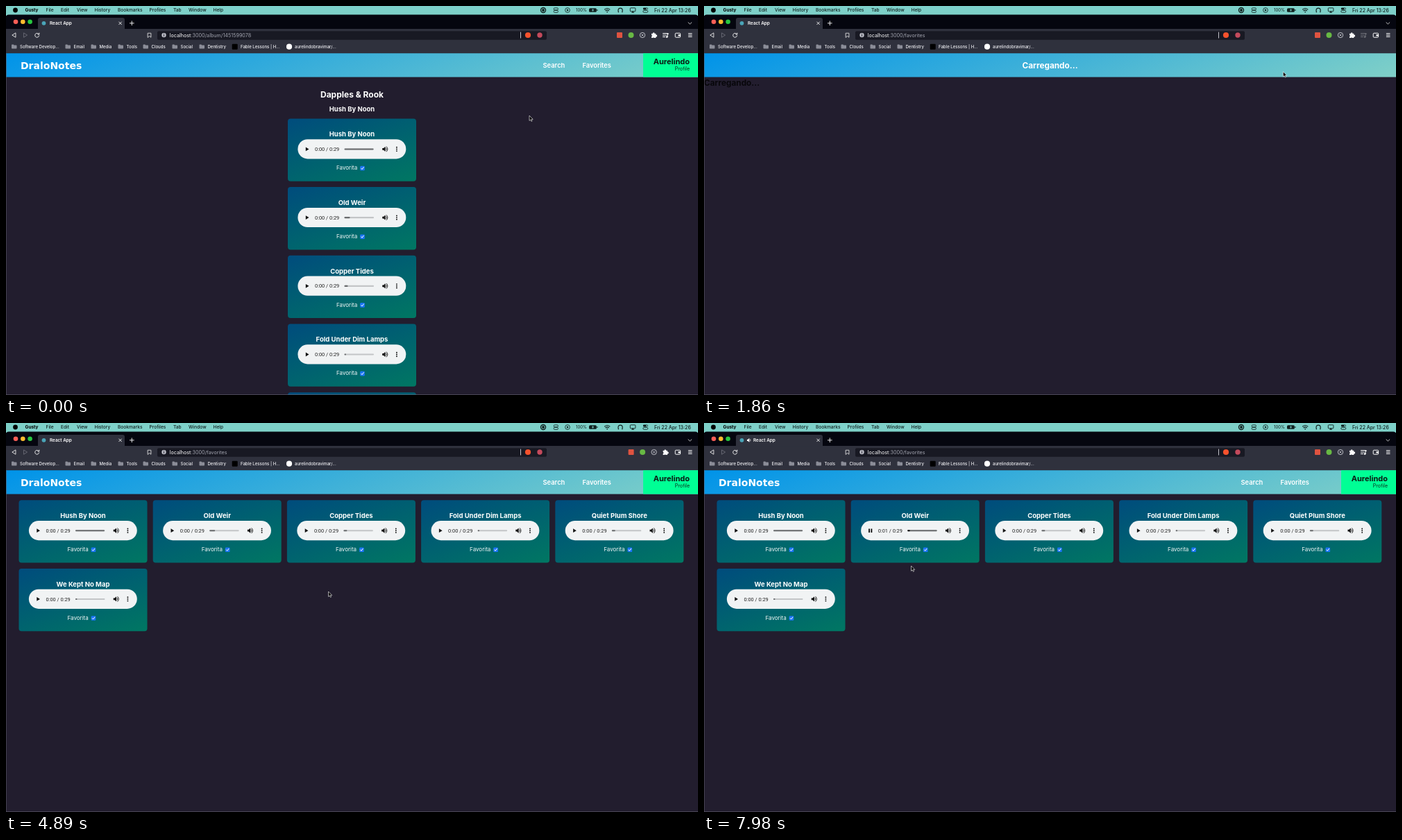
These frames come from a looping animation (997x561 px, 8000 ms). An HTML page:

```html
<!DOCTYPE html>
<html lang="en">
<head>
<meta charset="utf-8">
<title>Music player</title>
<style>
  html, body { margin: 0; width: 100%; height: 100%; overflow: hidden; background: #221d2e; }
  svg { display: block; width: 997px; height: 561px; font-family: Inter, sans-serif; }
</style>
</head>
<body>
<svg id="stage" viewBox="0 0 997 561"></svg>
<script>
const LOOP = 8000;
const TIMES = { status: 450, navigate: 780, loading: 1500, cards: 2000, header: 3000,
                iconGone: 3350, hover: 5650, play: 6250, unhover: 6590, speaker: 6750, second: 7300 };

// [time, x, y] of the pointer tip
const POINTER = [
  [0, 754, 158], [60, 754, 158], [600, 852, 88], [1750, 852, 88], [2550, 516, 215],
  [2950, 482, 271], [3450, 464.5, 243], [4920, 464.5, 243], [5250, 372, 254],
  [5700, 240, 156], [6440, 240, 156], [6570, 250, 184], [6950, 284, 244],
  [7420, 298.5, 206], [LOOP, 298.5, 206]
];

// title and buffered width of each track
const TRACKS = [
  ['Hush By Noon', 42], ['Old Weir', 8], ['Copper Tides', 5],
  ['Fold Under Dim Lamps', 2.5], ['Quiet Plum Shore', 5], ['We Kept No Map', 2.5]
];

const text = (x, cy, str, size, fill = '#fff', attrs = '') =>
  `<text x="${x}" y="${cy + size * 0.36}" font-size="${size}" fill="${fill}" ${attrs}>${str}</text>`;
const rect = (x, y, w, h, fill, r = 0, attrs = '') =>
  `<rect x="${x}" y="${y}" width="${w}" height="${h}" rx="${r}" fill="${fill}" ${attrs}/>`;
const circle = (x, y, r, fill, attrs = '') =>
  `<circle cx="${x}" cy="${y}" r="${r}" fill="${fill}" ${attrs}/>`;
const line = (d, color, width = 0.9) =>
  `<path d="${d}" fill="none" stroke="${color}" stroke-width="${width}" stroke-linecap="round" stroke-linejoin="round"/>`;
const shape = (d, fill, attrs = '') => `<path d="${d}" fill="${fill}" ${attrs}/>`;
const group = (id, body, attrs = '') => `<g id="${id}" ${attrs}>${body}</g>`;
const bold = 'font-weight="700"', medium = 'font-weight="500"', middle = 'text-anchor="middle"';

const defs = `<defs>
  <linearGradient id="bar" gradientUnits="userSpaceOnUse" x1="434.7" y1="-89.8" x2="562.3" y2="260.8">
    <stop stop-color="#0093e9"/><stop offset="1" stop-color="#80d0c7"/></linearGradient>
  <linearGradient id="card" gradientUnits="userSpaceOnUse" x1="67.1" y1="-24.5" x2="117.9" y2="115">
    <stop stop-color="#004c7d"/><stop offset="1" stop-color="#007762"/></linearGradient>
</defs>`;

function menuBar() {
  const items = [['File', 57.5], ['Edit', 79], ['View', 102], ['History', 127.5], ['Bookmarks', 161],
    ['Profiles', 206.5], ['Tab', 241], ['Window', 263], ['Help', 298.5]];
  const ink = '#10201f';
  return rect(0, 0, 997, 14, '#7dd0c8') + circle(13.5, 6, 3.4, '#000')
    + text(27.5, 6, 'Gusty', 6.5, '#000', bold)
    + items.map(([s, x]) => text(x, 6, s, 6.6, ink, medium)).join('')
    + circle(774, 6, 3.5, 'none', `stroke="${ink}" stroke-width="1.4"`) + circle(774, 6, 1.9, ink)
    + rect(789.3, 2.8, 6, 3, 'none', 1, `stroke="${ink}" stroke-width=".8"`)
    + rect(789.3, 6.4, 6, 3, 'none', 1, `stroke="${ink}" stroke-width=".8"`)
    + circle(809, 6, 3.4, 'none', `stroke="${ink}" stroke-width=".8"`) + shape('M808 4.3v3.4l2.8-1.7z', ink)
    + text(821, 6, '100%', 6, ink)
    + rect(840, 3.2, 10.8, 5.6, ink, 1.5) + rect(851.4, 5, 1, 2, ink) + shape('M846 3.6l-2.2 2.8h1.6l-.5 2 2.3-2.8h-1.6z', '#7dd0c8')
    + line('M862.5 5q3.7-3 7.4 0M864 6.8q2.2-1.8 4.4 0', ink, 1.1) + circle(866.2, 8.6, 0.9, ink)
    + line('M882 7.5v-1.3a3.1 3.1 0 0 1 6.2 0v1.3M882.3 7v2M887.9 7v2', ink, 1.1)
    + rect(899.3, 2.8, 7.6, 5, 'none', 0.8, `stroke="${ink}" stroke-width=".9"`) + shape('M901 9.8l2.1-2.6 2.1 2.6z', ink)
    + rect(917.8, 2.6, 7, 2.9, ink, 1.4) + rect(917.8, 6.4, 7, 2.9, 'none', 1.4, `stroke="${ink}" stroke-width=".8"`)
    + circle(923.2, 4, 0.9, '#7dd0c8') + text(934, 6, 'Fri 22 Apr 13:26', 7, ink, medium);
}

function browser() {
  const folders = [['Software Develop...', 8], ['Email', 85.5], ['Media', 122.5], ['Tools', 161.5],
    ['Clouds', 197.5], ['Social', 239.5], ['Dentistry', 278.5]];
  const folder = ([name, x]) =>
    shape(`M${x} 56.2q0-.8.8-.8h2l.9 1h3q.8 0 .8.8v3.6q0 .8-.8.8h-5.9q-.8 0-.8-.8z`, '#8b8d98')
    + text(x + 12, 58.7, name, 6.05, '#f0f0f4', medium);
  return shape('M0 69V16.4q0-4 4-4h989q4 0 4 4V69z', '#05060f')
    + ['#ff5f57', '#febc2e', '#28c840'].map((c, i) => circle(14 + i * 10.3, 22.8, 3.3, c)).join('')
    + rect(0, 33, 997, 35.7, '#2f313d') + shape('M46 33.2V20q0-3 3-3h119q3 0 3 3v13.2z', '#2f313d')
    + circle(54.5, 24.8, 2.9, '#4aa5b8')
    + group('speaker', shape('M62 23.7h1.3l2-1.9v6l-2-1.9H62z', '#fff') + line('M66.6 23.5q1 1.3 0 2.6', '#fff', 0.7))
    + text(63, 24.8, 'React App', 6.4, '#fff', 'id="tabTitle" font-weight="600"')
    + line('M162.8 23l3.6 3.6m0-3.6l-3.6 3.6', '#fff') + line('M178.4 24.8h5.8m-2.9-2.9v5.8', '#fff')
    + line('M983 23.8l2.4 2.2 2.4-2.2', '#ddd')
    + line('M13.6 39l-4.8 3 4.8 3z', '#eee') + line('M25.8 39l4.8 3-4.8 3z', '#6c6e79')
    + line('M47.3 40.6a3 3 0 1 0 .4 2.2M47.8 39v2h-2', '#fff')
    + line('M204.5 39.2h4.4v6l-2.2-1.8-2.2 1.8z', '#ddd')
    + rect(218, 36.2, 561, 12.6, '#181923', 2)
    + circle(227.5, 42, 3.2, '#b8b9c2') + line('M227.5 41.6v1.9M227.5 40v.1', '#181923')
    + `<text x="235.7" y="44.6" font-size="7.2" fill="#a3a5b0"><tspan fill="#fff">localhost</tspan><tspan id="path"></tspan></text>`
    + rect(741, 37.5, 0.9, 9, '#d8d8df')
    + circle(752, 42, 4.1, '#f6522d') + circle(769, 42, 3.7, '#c44a5c')
    + group('extensions',
        rect(880, 38, 8, 8, '#df5340', 1) + circle(900.5, 42, 4, '#68b944')
        + circle(917, 42, 3.7, 'none', 'stroke="#c8c9d0" stroke-width=".9"') + line('M915.7 40.7l2.6 2.6m0-2.6l-2.6 2.6', '#c8c9d0', 0.8)
        + shape('M930 39.8h1.9a1.3 1.3 0 1 1 2.5 0h1.9v2a1.3 1.3 0 1 1 0 2.4v1.9h-2.2a1.2 1.2 0 0 0-2.2 0H930v-2a1.3 1.3 0 0 0 0-2.4z', '#fff'))
    + group('media', line('M946.5 39.5h7.5M946.5 42h4.5M946.5 44.5h3M953 44.5v-4.3h1.3', '#fff', 1.1) + circle(952.1, 44.6, 1.3, '#fff'))
    + rect(964.2, 39.2, 7.4, 6, 'none', 1, 'stroke="#fff" stroke-width="1"') + rect(968.5, 41, 3.4, 2.4, '#fff', 0.5)
    + line('M983.3 39.7h4.8M983.3 42h4.8M983.3 44.3h4.8', '#fff', 1)
    + folders.map(folder).join('')
    + rect(325.7, 54.7, 8, 8, '#000', 1) + text(338, 58.7, 'Fable Lessons | H...', 6.05, '#f0f0f4', medium)
    + circle(408, 58.7, 4.1, '#fff') + text(416, 58.7, 'aurelindobravimar/...', 6.05, '#f0f0f4', medium);
}

function card([title, buffered], x, y, live = false) {
  const ink = '#111';
  const id = name => live ? `id="${name}"` : '';
  return `<g transform="translate(${x} ${y})">`
    + rect(0, 0, 185, 90.3, 'url(#card)', 4)
    + text(92.5, 22.5, title, 9.5, '#fff', `${bold} ${middle}`)
    + rect(14.4, 29.8, 155.9, 28.2, '#f1f3f4', 14.1)
    + (live ? circle(28, 44, 8, '#dcdee0', 'id="hoverDisc"') : '')
    + shape('M25.8 41.1v5.8l4.7-2.9z', ink, id('playIcon'))
    + (live ? shape('M25.4 41.2h1.9v5.6h-1.9zM28.7 41.2h1.9v5.6h-1.9z', ink, 'id="pauseIcon"') : '')
    + text(39, 44, `<tspan ${id('clock')}>0:00</tspan> / 0:29`, 7.4, '#222', 'font-family="Roboto, sans-serif"')
    + rect(81.5, 43, 42.5, 2.1, '#c3c5c7', 1) + rect(81.5, 43, buffered, 2.1, '#6a6c6e', 1, id('buffer'))
    + (live ? rect(81.5, 43, 0, 2.1, '#111', 1, 'id="played"') : '')
    + shape('M136.2 42.6h1.8l2.5-2.3v7.4l-2.5-2.3h-1.8z', ink) + line('M141.7 42.4q1.3 1.6 0 3.2M142.3 40.5q3.4 3.5 0 7', ink, 0.9)
    + [41.3, 44, 46.7].map(cy => circle(156.9, cy, 0.95, ink)).join('')
    + text(70, 71.1, 'Favorita', 8, '#f4f8f8')
    + rect(104.2, 68.3, 6.6, 6.6, '#1a75f5', 1.2) + line('M105.7 71.7l1.3 1.4 2.3-3', '#fff', 1)
    + '</g>';
}

const album = text(498.5, 127.2, 'Dapples &amp; Rook', 12, '#fff', `${bold} ${middle}`)
  + text(498.5, 148.3, TRACKS[0][0], 9.5, '#fff', `${bold} ${middle}`)
  + TRACKS.slice(0, 5).map((t, i) => card(t, 406, 162.4 + i * 98.7)).join('');
const grid = TRACKS.map((t, i) => card(t, 18.5 + (i % 5) * 193.2, 111.2 + Math.floor(i / 5) * 98.7, i === 1)).join('');
const nav = text(21, 86.2, 'DraloNotes', 14, '#fff', `${bold} font-family="DejaVu Sans, sans-serif"`)
  + text(773.5, 86, 'Search', 9.4, '#fff', 'font-weight="600"')
  + text(830.5, 86, 'Favorites', 9.3, '#fff', 'font-weight="600"')
  + rect(918, 68.2, 79, 34.3, '#00ff95')
  + text(985, 80, 'Aurelindo', 11, '#0b1a14', `${bold} text-anchor="end"`)
  + text(985, 90.7, 'Profile', 7, '#0b2a1c', 'text-anchor="end"');

const stage = document.getElementById('stage');
const edge = '#5b5866';
stage.innerHTML = defs + rect(0, 0, 997, 561, '#221d2e')
  + group('album', album) + group('grid', grid)
  + group('bodyLoading', text(0, 110.8, 'Carregando...', 11.8, '#08070b', bold))
  + menuBar() + browser()
  + rect(0, 68.2, 997, 34.3, 'url(#bar)') + group('nav', nav)
  + group('navLoading', text(498.5, 86.2, 'Carregando...', 11.8, '#fff', `${bold} ${middle}`))
  + rect(0, 68.2, 0.6, 492.8, edge) + rect(0, 560.3, 997, 0.7, edge)
  + group('status', rect(-1, 550.3, 333, 10.2, '#2f313d', 1.5)
      + text(2, 555.8, 'localhost:3000/favorites', 6.2, '#f0f0f4', medium))
  + group('pointer', shape('M0 0v7.4l1.7-1.5 1.2 2.5 1.2-.6-1.2-2.4h2.3z', '#000', 'stroke="#fff" stroke-width=".6" stroke-linejoin="round"'));

const ui = Object.fromEntries([...stage.querySelectorAll('[id]')].map(e => [e.id, e]));
const show = (name, on) => { ui[name].style.display = on ? '' : 'none'; };
const ramp = (t, from, to) => Math.min(1, Math.max(0, (t - from) / (to - from)));
const ease = p => p * p * (3 - 2 * p);

function pointerAt(t) {
  const i = POINTER.findIndex(k => k[0] > t);
  const [t0, x0, y0] = POINTER[i - 1], [t1, x1, y1] = POINTER[i];
  const p = ease((t - t0) / (t1 - t0));
  return [x0 + (x1 - x0) * p, y0 + (y1 - y0) * p];
}

function render(t) {
  const T = TIMES, playing = t >= T.play;
  const between = (a, b) => t >= a && t < b;
  show('album', t < T.loading);
  show('bodyLoading', between(T.loading, T.cards));
  show('grid', t >= T.cards);
  show('navLoading', between(T.loading, T.header));
  show('nav', !between(T.loading, T.header));
  show('status', between(T.status, 1900));
  ui.status.style.opacity = 1 - ramp(t, T.loading, 1850);
  ui.path.textContent = t < T.navigate ? ':3000/album/1451599078' : ':3000/favorites';

  show('media', t < T.iconGone || playing);
  ui.media.style.opacity = between(T.navigate, T.play) ? 0.3 : 1;
  const shift = 16.6 * (ramp(t, T.iconGone, T.iconGone + 150) - ramp(t, T.play, T.play + 150));
  ui.extensions.setAttribute('transform', `translate(${shift} 0)`);

  show('hoverDisc', between(T.hover, T.unhover));
  show('playIcon', !playing);
  show('pauseIcon', playing);
  show('speaker', t >= T.speaker);
  ui.tabTitle.setAttribute('x', playing ? 71 : 63);
  ui.clock.textContent = t >= T.second ? '0:01' : '0:00';
  ui.buffer.setAttribute('width', playing ? 42.5 : TRACKS[1][1]);
  ui.played.setAttribute('width', playing ? 1 + (t - T.play) / 29000 * 42.5 : 0);
  ui.pointer.setAttribute('transform', `translate(${pointerAt(t)})`);
}

const start = performance.now();
function tick() {
  render((performance.now() - start) % LOOP);
  requestAnimationFrame(tick);
}
tick();
</script>
</body>
</html>
```
